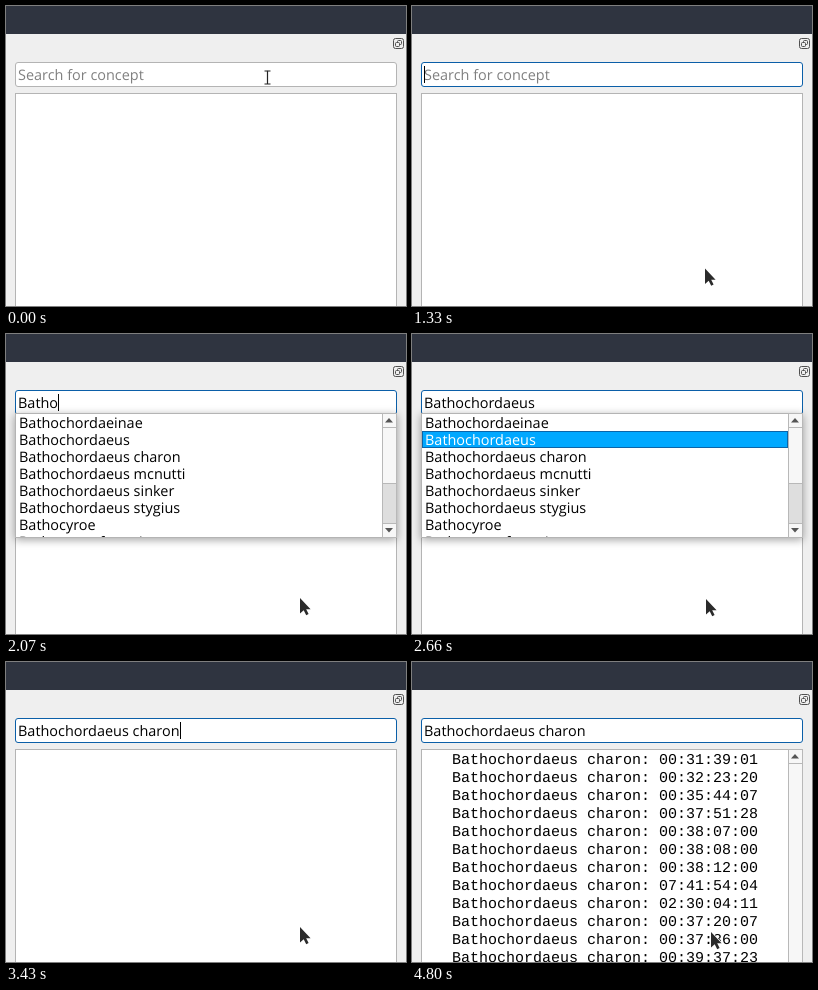
An HTML page for the animation above (4.86 s loop, 400 px wide and 300 px high).

```html
<!DOCTYPE html>
<html lang="en">
<head>
<meta charset="utf-8">
<title>Concept search</title>
<style>
  html, body { margin: 0; width: 100%; height: 100%; overflow: hidden; background: #efefef; }
  svg { display: block; width: 400px; height: 300px; }
  text { font: 14.45px "Open Sans", "Noto Sans", sans-serif; fill: #000; white-space: pre; text-rendering: geometricPrecision; }
  .mono text { font: 15px "Liberation Mono", monospace; }
  .frame { fill: #fff; stroke: #b4b4b4; }
  #field.focused { stroke: #0b5fa8; }
  #placeholder { fill: #808080; }
  #popupBox { filter: drop-shadow(0 2px 4px rgba(0, 0, 0, .36)); }
  .button { fill: #f7f7f7; stroke: #b8b8b8; }
  .groove { fill: #dedede; stroke: #b8b8b8; }
  .arrow { fill: #555; }
  .selected { fill: #fff; }
</style>
</head>
<body>
<svg id="stage" viewBox="0 0 400 300">
  <defs>
    <clipPath id="popupClip"><rect x="10" y="80" width="366" height="123"/></clipPath>
  </defs>
  <rect width="400" height="300" fill="#efefef"/>
  <rect width="400" height="28" fill="#2f3440"/>

  <g fill="none" stroke="#505050">
    <rect x="387.5" y="32.5" width="10" height="10" rx="2"/>
    <rect x="391.5" y="34.5" width="4" height="4" rx="1"/>
    <rect x="389.5" y="36.5" width="4" height="4" rx="1" fill="#efefef"/>
  </g>

  <rect class="frame" id="field" x="9.5" y="56.5" width="381" height="24" rx="2.5"/>
  <text id="placeholder" x="12" y="74">Search for concept</text>
  <text id="query" x="12" y="74"></text>
  <rect id="caret" y="60" width="1" height="17"/>

  <rect class="frame" x="9.5" y="87.5" width="381" height="230"/>
  <g id="results" class="mono">
    <rect class="button" x="376.5" y="87.5" width="14" height="14"/>
    <rect class="button" x="376.5" y="101.5" width="14" height="210"/>
    <path class="arrow" d="M379 96.5h8l-4-4.5z"/>
  </g>

  <g id="popup">
    <rect id="popupBox" class="frame" x="9.5" y="79.5" width="381" height="124"/>
    <g clip-path="url(#popupClip)">
      <rect id="highlight" x="10.5" width="365" height="16" fill="#00a8ff" stroke="#0b64a8"/>
      <g id="items"></g>
    </g>
    <rect class="groove" x="376.5" y="79.5" width="14" height="124"/>
    <rect class="button" x="376.5" y="79.5" width="14" height="14"/>
    <rect class="button" x="376.5" y="189.5" width="14" height="14"/>
    <rect class="button" id="handle" x="376.5" y="93.5" width="14"/>
    <path class="arrow" d="M379 88.5h8l-4-4.5zM379 194h8l-4 4.5z"/>
  </g>

  <path id="ibeam" d="M-3 -6.5h2.5l.5 .5 .5 -.5h2.5M0 -6v12M-3 6.5h2.5l.5 -.5 .5 .5h2.5"
        fill="none" stroke="#222" stroke-width="1.2"/>
  <path id="pointer" d="M0 0V15.5L3.7 12.2 6.2 17.2 8.6 16 6.2 11.2H10.6Z"
        fill="#2b2b2b" stroke="#fff" stroke-width="1.6" paint-order="stroke"/>
</svg>
<script>
const LOOP = 4860;
const $ = id => document.getElementById(id);

const BROAD = ["Bacescomysis", "Bacteria", "bacterial mat", "Bajacalifornia",
               "Balanus", "Barathronus", "Bargmannia", "Bassozetus"];
const NARROW = ["Bathochordaeinae", "Bathochordaeus", "Bathochordaeus charon", "Bathochordaeus mcnutti",
                "Bathochordaeus sinker", "Bathochordaeus stygius", "Bathocyroe", "Bathocyroe fosteri"];
const TIMES = ["00:31:39:01", "00:32:23:20", "00:35:44:07", "00:37:51:28", "00:38:07:00", "00:38:08:00",
               "00:38:12:00", "07:41:54:04", "02:30:04:11", "00:37:20:07", "00:37:36:00", "00:39:37:23"];

// Each track lists [start ms, value]; a value holds until the next entry.
const QUERY = [[0, ""], [1520, "B"], [1660, "Ba"], [1800, "Bat"], [1870, "Bath"], [1930, "Batho"],
               [2470, NARROW[0]], [2660, NARROW[1]], [3030, NARROW[2]]];
const SELECTED = [[0, -1], [2470, 0], [2660, 1], [3030, 2]];
const HANDLE = [[0, 14], [1800, 20], [1870, 26], [1930, 56]];
const CARET = [[0, 0], [160, 1], [670, 0], [1160, 1], [2420, 0], [3070, 1], [3800, 0], [4250, 1], [4800, 0]];
const POINTER = [[1000, [292, 259]], [1230, [292, 260]], [1280, [293, 262]], [1330, [293, 262.5]],
                 [2020, [294, 263.5]], [2070, [294, 264]], [2470, [294, 265]],
                 [4450, [297, 268]], [4490, [299, 270]]];

const at = (track, t) => track.findLast(([start]) => start <= t)[1];
const show = (id, on) => $(id).setAttribute("display", on ? "inline" : "none");

function addText(parent, x, y, content) {
  const node = document.createElementNS("http://www.w3.org/2000/svg", "text");
  node.setAttribute("x", x);
  node.setAttribute("y", y);
  node.textContent = content;
  parent.append(node);
  return node;
}

const rows = NARROW.map((name, i) => addText($("items"), 13, 94 + 17 * i, name));
TIMES.forEach((time, i) => addText($("results"), 40, 102 + 18 * i, `Bathochordaeus charon: ${time}`));

// The main sweep advances in discrete steps along an eased line.
function pointerAt(t) {
  if (t >= 1000) return at(POINTER, t);
  const step = Math.max(0, Math.floor((t - 670) / 47)) / 7;
  const p = step * step * (3 - 2 * step);
  return [261.5 + 30.5 * p, 71.5 + 187.5 * p];
}

function draw(t) {
  const query = at(QUERY, t), selected = at(SELECTED, t);
  const popupOpen = t >= 1520 && t < 3430;

  $("field").classList.toggle("focused", t >= 160);
  show("placeholder", !query);
  $("query").textContent = query;
  $("caret").setAttribute("x", 12 + Math.round(query ? $("query").getComputedTextLength() : 0));
  show("caret", at(CARET, t));
  show("results", t >= 3800);

  show("popup", popupOpen);
  if (popupOpen) {
    const names = t < 1800 ? BROAD : NARROW;
    rows.forEach((row, i) => {
      row.textContent = names[i];
      row.classList.toggle("selected", i === selected);
    });
    show("highlight", selected >= 0);
    $("highlight").setAttribute("y", 80.5 + 17 * selected);
    $("handle").setAttribute("height", at(HANDLE, t));
  }

  const [x, y] = pointerAt(t), overField = y < 81;
  show("ibeam", overField);
  show("pointer", !overField);
  $(overField ? "ibeam" : "pointer").setAttribute("transform", `translate(${x} ${y})`);
}

const begin = performance.now();
function tick() {
  draw((performance.now() - begin) % LOOP);
  requestAnimationFrame(tick);
}
tick();
</script>
</body>
</html>
```
